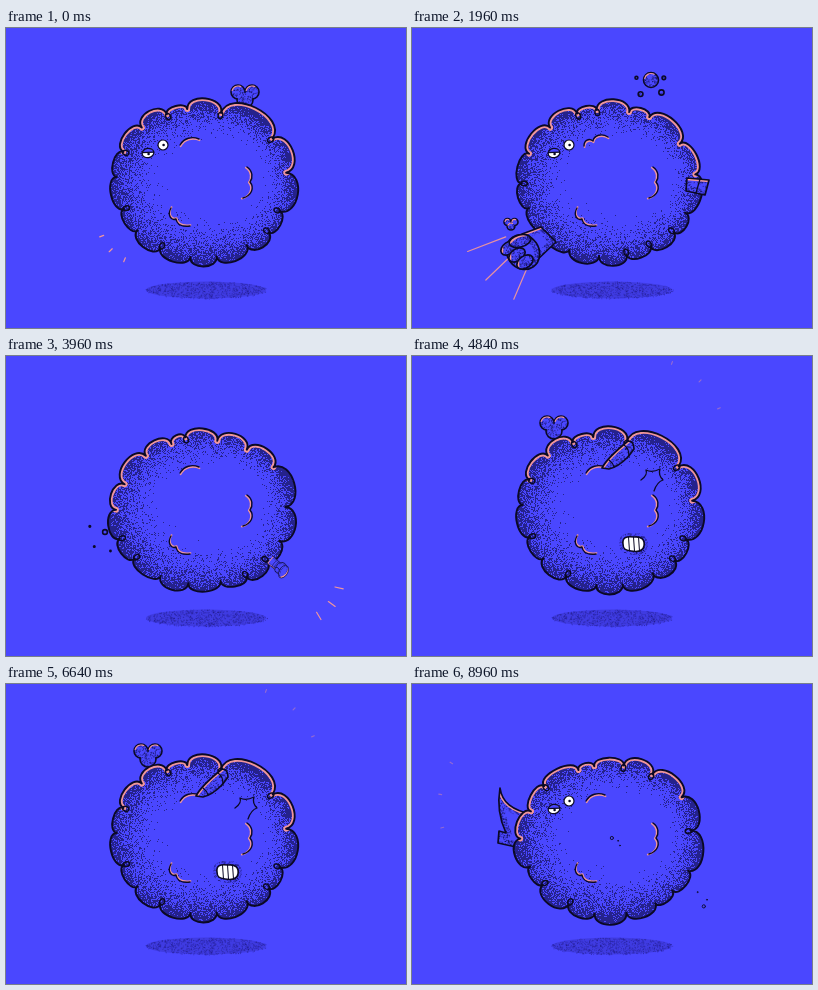
An HTML page with a canvas for the animation above (9000 ms loop, 400 by 300 pixels).

```html
<!DOCTYPE html>
<html lang="en">
<head>
<meta charset="utf-8">
<title>Fight cloud</title>
<style>
  html, body { margin: 0; width: 100%; height: 100%; overflow: hidden; background: #4a47ff; }
  canvas { display: block; width: 400px; height: 300px; }
</style>
</head>
<body>
<canvas id="stage" width="400" height="300"></canvas>
<script>
const W = 400, H = 300, LOOP = 1800, STEP = 40, HOLD = 100;
const BLUE = '#4a47ff', INK = '#0b0925', GRAIN = 'rgba(16,12,70,.62)', PINK = '#f0969b', WHITE = '#fff';
const CX = 198, CY = 155, TAU = Math.PI * 2, RAD = Math.PI / 180;
const ctx = document.getElementById('stage').getContext('2d');

const clamp = v => Math.max(0, Math.min(1, v));
const easeOut = v => 1 - (1 - clamp(v)) ** 3;
const since = (t, start) => (((t - start) % LOOP) + LOOP) % LOOP;

function random(seed) {
  return () => {
    seed = (seed + 0x6d2b79f5) | 0;
    let v = Math.imul(seed ^ (seed >>> 15), 1 | seed);
    v = (v + Math.imul(v ^ (v >>> 7), 61 | v)) ^ v;
    return ((v ^ (v >>> 14)) >>> 0) / 4294967296;
  };
}

function layer(w, h) {
  const c = document.createElement('canvas');
  c.width = w; c.height = h;
  return c;
}

function oval(x, y, rx, ry = rx, turn = 0) {
  const p = new Path2D();
  p.ellipse(x, y, rx, ry, turn * RAD, 0, TAU);
  return p;
}

function line(g, path, color, width) {
  g.strokeStyle = color;
  g.lineWidth = width;
  g.stroke(path);
}

function fill(g, path, color) {
  g.fillStyle = color;
  g.fill(path);
}

function grainTile() {
  const size = 97, c = layer(size, size), g = c.getContext('2d'), rnd = random(5);
  g.fillStyle = GRAIN;
  for (let i = 0; i < 3600; i++) g.fillRect(rnd() * size, rnd() * size, 1, 1);
  return ctx.createPattern(c, 'repeat');
}
const grain = grainTile();

/* Cloud: bumps meet at these angles, shaken a little for each drawing */
const MEETS = [-139, -116, -102, -77, -57, -31, -5, 22, 39, 56, 78, 100, 123, 144, 161, 182, 200];
const reach = a => 79.5 + 6 * Math.cos(2 * a) - 2 * Math.cos(a);

function bumpList(rnd, wide) {
  const meets = wide ? MEETS.filter(a => a !== -57) : MEETS;
  const pts = meets.map(deg => {
    const a = (deg + rnd() * 5 - 2.5) * RAD, r = reach(a) + rnd() * 5 - 2.5;
    return [CX + Math.cos(a) * r, CY + Math.sin(a) * r];
  });
  return pts.map(([x, y], i) => {
    const [u, v] = pts[(i + 1) % pts.length], dx = u - x, dy = v - y;
    const out = 0.36 + rnd() * 0.17, flare = 0.06;
    return {
      x, y, up: -dx / Math.hypot(dx, dy),
      curve: [x + dy * out - dx * flare, y - dx * out - dy * flare,
        u + dy * out + dx * flare, v - dx * out + dy * flare, u, v]
    };
  });
}

function paintGrain(g, rnd) {
  g.fillStyle = GRAIN;
  for (let y = 60; y < 245; y++) {
    for (let x = 98; x < 298; x++) {
      const dx = x - CX, dy = y - CY, a = Math.atan2(dy, dx);
      const depth = reach(a) + 8 - Math.hypot(dx, dy);
      const fade = clamp(1 - depth / (50 + 14 * Math.cos(a - 2.5)));
      if (rnd() < 0.95 * fade ** 2.6) g.fillRect(x, y, 1, 1);
    }
  }
}

function paintShadow(g, rnd) {
  fill(g, oval(200, 262, 60, 8.5), 'rgba(40,34,160,.3)');
  g.fillStyle = 'rgba(26,20,110,.35)';
  for (let i = 0; i < 700; i++) {
    const a = rnd() * TAU, r = Math.sqrt(rnd());
    g.fillRect(200 + Math.cos(a) * r * 61, 262 + Math.sin(a) * r * 8.6, 1, 1);
  }
}

const BROWS = ['M174 117C178 110 186 108 193 111', 'M172 118C172 112 177 110 181 113C182 107 190 105 196 109'];
const CHEEK = 'M241 139C247 143 247 150 244 154C249 160 245 168 237 170';
const CHIN = 'M165 180C161 187 165 193 170 191C171 197 177 199 184 198';

function paintFolds(g, brow) {
  const fold = (d, dx, dy) => {
    const p = new Path2D(d);
    g.save();
    g.translate(dx, dy);
    line(g, p, PINK, 1.6);
    g.restore();
    line(g, p, INK, 1.4);
  };
  fold(brow, 0.6, 1.3);
  fold(CHEEK, -1.3, 0.6);
  fold(CHIN, 0.6, -1);
}

function paintCloud(index) {
  const body = layer(W, H), under = layer(W, H), g = body.getContext('2d');
  const rnd = random(40 + index), list = bumpList(rnd, index % 4 === 0);
  const outline = new Path2D();
  g.lineCap = g.lineJoin = 'round';
  outline.moveTo(list[0].x, list[0].y);
  list.forEach(b => outline.bezierCurveTo(...b.curve));
  outline.closePath();

  fill(g, outline, BLUE);
  g.save();
  g.clip(outline);
  paintGrain(g, rnd);
  for (const b of list.filter(b => b.up < -0.3)) {
    const rim = new Path2D();
    rim.moveTo(b.x, b.y);
    rim.bezierCurveTo(...b.curve);
    line(g, rim, PINK, 5.6);
  }
  g.restore();
  line(g, outline, INK, 1.9);

  for (const { x, y } of list.filter(() => rnd() < 0.35)) {
    const a = Math.atan2(CY - y, CX - x);
    line(g, oval(x + Math.cos(a) * 2.5, y + Math.sin(a) * 2.5, 3.3, 2.3, a / RAD), INK, 1.5);
  }
  paintFolds(g, BROWS[index === 1 || index === 2 ? 1 : 0]);
  paintShadow(under.getContext('2d'), rnd);
  return { body, under };
}
const clouds = Array.from({ length: 6 }, (_, i) => paintCloud(i));

/* Limbs, drawn around the point where they leave the cloud */
const detail = (d, color = INK, width = 1.3) => line(ctx, new Path2D(d), color, width);

function solid(shape, rim) {
  const p = typeof shape === 'string' ? new Path2D(shape) : shape;
  fill(ctx, p, BLUE);
  ctx.save();
  ctx.clip(p);
  line(ctx, p, grain, 11);
  if (rim) detail(rim, PINK, 4.5);
  ctx.restore();
  line(ctx, p, INK, 1.7);
}

function glove() {
  solid('M-15 0L-13 -34H12L13 0', 'M12 -34L13 0H-15');
  for (const y of [-17, -24]) detail(`M-14 ${y}Q0 ${y + 4} 12 ${y}`);
  solid(oval(-3, -41, 18, 15));
  solid(oval(10, -37, 7, 10, 15));
  solid(oval(1, -54, 21, 13, -10), 'M-18 -60Q0 -72 21 -58');
}

function fist() {
  solid('M-28 0L-9 -7L6 8L-14 27Z', 'M-28 0L-9 -7');
  solid(oval(-27, 18, 16, 18, -35));
  for (let i = 0; i < 3; i++) {
    const x = -41 + i * 8, y = 14 + i * 7;
    solid(oval(x, y, 9, 6, -35), `M${x - 8} ${y + 5}L${x - 8} ${y - 3}`);
  }
  solid(oval(-30, 7, 11, 6, -15), 'M-41 8Q-34 0 -24 0');
}

function stub() {
  solid('M0 -6L22 -4L18 11L-1 7Z', 'M0 -6L22 -4');
  detail('M13 -5L9 9');
}

function sleeve() {
  solid('M-18 14C-15 8 -8 0 8 -13Q14 -13 14 -5L8 3Q-2 13 -11 15Z', 'M-18 14C-15 8 -8 0 8 -13');
  detail('M-11 6Q-7 9 -6 13M4 -9Q9 -6 9 2M21 26Q28 21 26 16Q32 19 40 15Q38 21 43 26Q37 28 34 37');
}

function shoe() {
  solid('M-24 -27C-22 -13 -13 -5 10 0V36L-26 28L-25 16L-18 18Q-28 -3 -24 -27Z', 'M-24 -27C-22 -13 -13 -5 10 0');
}

const limbs = [
  { draw: fist, from: 20, span: 290, x: 138, y: 206 },
  { draw: stub, from: 70, span: 230, x: 275, y: 156 },
  { draw: glove, from: 350, span: 290, x: 264, y: 204, turn: 130 },
  { draw: glove, from: 640, span: 310, x: 152, y: 122, turn: -54 },
  { draw: glove, from: 960, span: 230, x: 247, y: 112, turn: 42 },
  { draw: sleeve, from: 1160, span: 140, x: 208, y: 98 },
  { draw: shoe, from: 1460, span: 335, x: 112, y: 131, behind: true }
];

function drawLimbs(t, behind) {
  for (const { draw, from, span, x, y, turn = 0, ...limb } of limbs) {
    const age = since(t, from);
    if (age >= span || !!limb.behind !== behind) continue;
    const out = easeOut(age / 80) * easeOut((span - age) / 35);
    ctx.save();
    ctx.translate(x, y);
    ctx.rotate(turn * RAD);
    ctx.scale(out, out);
    draw();
    ctx.restore();
  }
}

/* Impact lines: three rays shoot out, then their tails catch up */
const bursts = [
  { from: 1785, x: 135, y: 193, aim: 136 },
  { from: 330, x: 290, y: 222, aim: 36 },
  { from: 575, x: 118, y: 104, aim: -144 },
  { from: 930, x: 230, y: 85, aim: -46 },
  { from: 1450, x: 111, y: 122, aim: -172 }
];

function drawBursts(t) {
  for (const { from, x, y, aim } of bursts) {
    const p = since(t, from) / 320;
    if (p >= 1) continue;
    const tail = clamp(p * 2 - 1), head = Math.max(clamp(p * 2), tail + 0.03);
    ctx.globalAlpha = 1 - 0.6 * tail;
    for (const spread of [-23, 0, 23]) {
      const a = (aim + spread) * RAD;
      const at = s => `${x + Math.cos(a) * (40 + 45 * s)} ${y + Math.sin(a) * (40 + 45 * s)}`;
      detail(`M${at(tail)}L${at(head)}`, PINK, 1.2);
    }
    ctx.globalAlpha = 1;
  }
}

/* Puffs rise as three joined lobes, then break into bubbles */
const puffs = [
  { from: 1780, x: 239, y: 70 },
  { from: 60, x: 99, y: 206, size: 0.5 },
  { from: 640, x: 126, y: 245 },
  { from: 1180, x: 142, y: 77 }
];

function puffDots(age, size, rnd) {
  if (age < 120) return [[-7, -4, 7], [7, -4, 7], [0, 4, 8]].map(d => d.map(v => v * size));
  const shrink = size * easeOut((320 - age) / 70);
  const small = Array.from({ length: 4 }, (_, i) => {
    const a = i * 1.1 - 0.3 + rnd() * 0.5, r = 13 + rnd() * 7;
    return [Math.cos(a) * r, Math.sin(a) * r, (1.2 + rnd() * 2.6) * shrink];
  });
  return [[0, 0, 7.5 * shrink], ...small];
}

function drawPuffs(t) {
  puffs.forEach(({ from, x, y, size = 1 }, i) => {
    const age = since(t, from);
    if (age >= 320) return;
    const dots = puffDots(age, size, random(i));
    const ring = grow => {
      const p = new Path2D();
      dots.forEach(([dx, dy, r]) => p.addPath(oval(x + dx, y + dy - age * 0.1, Math.max(0.1, r + grow))));
      return p;
    };
    fill(ctx, ring(0.8), INK);
    fill(ctx, ring(-0.8), BLUE);
    fill(ctx, ring(-0.8), grain);
    for (const [dx, dy, r] of dots) {
      if (r < 3 || dy > 2) continue;
      const arc = new Path2D();
      arc.arc(x + dx, y + dy - age * 0.1, r - 1, 3.4, 5.2);
      line(ctx, arc, PINK, 1.2);
    }
  });
}

/* Loose specks */
const sprays = [[700, 192, 130], [700, 200, 173], [700, 280, 222], [1660, 200, 162], [1660, 287, 216]];

function drawSpecks(t) {
  sprays.forEach(([from, x, y], i) => {
    const age = since(t, from), rnd = random(70 + i);
    if (age >= 140) return;
    for (let k = 0; k < 3; k++) {
      const a = rnd() * TAU, r = 4 + age * 0.04;
      const dot = oval(x + Math.cos(a) * r, y + Math.sin(a) * r, k ? 0.5 : 1.6);
      fill(ctx, dot, BLUE);
      line(ctx, dot, INK, 0.9);
    }
  });
}

/* Face parts */
function eye(x, y, r, sleepy) {
  ctx.save();
  ctx.translate(x, y);
  const ball = sleepy ? oval(0, 0, r * 1.2, r * 0.95, -10) : oval(0, 0, r);
  fill(ctx, ball, WHITE);
  if (sleepy) {
    ctx.save();
    ctx.clip(ball);
    ctx.fillStyle = BLUE;
    ctx.fillRect(-8, -8, 16, 7.2);
    ctx.restore();
    detail(`M${-r * 1.2} -0.4L${r * 1.2} -0.9`, INK, 1.1);
  }
  line(ctx, ball, INK, 1.2);
  fill(ctx, oval(0.6, sleepy ? 1 : 0, 1.3), INK);
  ctx.restore();
}

function teeth() {
  const p = new Path2D('M-11 0C-12 -7 -7 -8 0 -7C8 -8 11 -4 10 2C9 8 3 8 -3 7C-9 6 -11 5 -11 0Z');
  ctx.save();
  ctx.translate(222, 188);
  line(ctx, p, grain, 7);
  fill(ctx, p, WHITE);
  for (const x of [-5, 0, 5]) detail(`M${x - 0.5} -7L${x + 0.5} 7`, INK, 1);
  line(ctx, p, INK, 1.6);
  ctx.restore();
}

function drawFace(t) {
  if (since(t, 1440) < 700) {
    eye(142, 125, 4.9, true);
    eye(157, 117, 5);
  }
  if (since(t, 560) < 840) teeth();
  if (since(t, 690) < 200) {
    eye(154, 88, 4.8);
    eye(115, 117, 3.8, true);
  }
}

function draw(time) {
  const t = Math.floor(time / STEP) * STEP % LOOP;
  const cloud = clouds[Math.floor(t / HOLD) % clouds.length];
  ctx.lineCap = ctx.lineJoin = 'round';
  ctx.fillStyle = BLUE;
  ctx.fillRect(0, 0, W, H);
  ctx.drawImage(cloud.under, 0, 0);
  drawBursts(t);
  drawPuffs(t);
  drawLimbs(t, true);
  ctx.drawImage(cloud.body, 0, 0);
  drawLimbs(t, false);
  drawFace(t);
  drawSpecks(t);
}

const start = performance.now();
function tick() {
  draw(performance.now() - start);
  requestAnimationFrame(tick);
}
tick();
</script>
</body>
</html>
```
